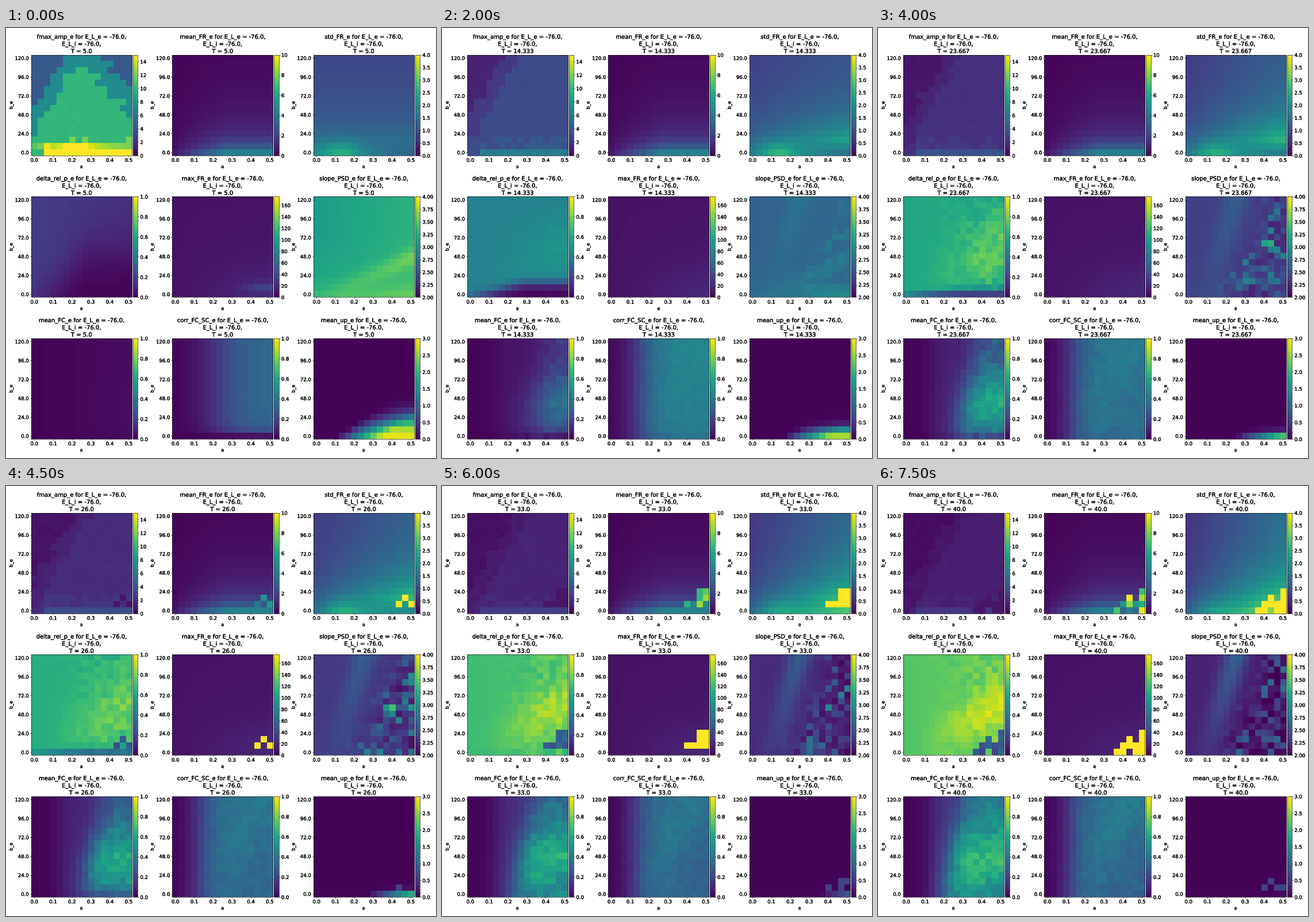
A matplotlib script that plays this animation: 748x748 px, repeating every 8 s.

```python
import numpy as np
import matplotlib.pyplot as plt
from matplotlib.animation import FuncAnimation
from matplotlib.patheffects import withStroke

SIZE, DPI, N, FRAMES = 748, 36, 16, 16
PANEL = 175.2

plt.rcParams.update({
    "font.family": "DejaVu Sans", "axes.linewidth": 1.2,
    "xtick.major.width": 1.2, "ytick.major.width": 1.2,
    "xtick.labelsize": 17, "ytick.labelsize": 17,
    "xtick.major.pad": 4.5, "ytick.major.pad": 4.5,
    "axes.labelsize": 16, "axes.titlesize": 20,
})

J, I = np.mgrid[:N, :N]
x, y = I / (N - 1), J / (N - 1)


def sigmoid(v):
    return 1 / (1 + np.exp(-np.clip(v, -40, 40)))


def bump(v, width):
    return np.exp(-(v / width) ** 2)


def ramp(v, start, end):
    return np.clip((v - start) / (end - start), 0, 1)


class Moment:
    """Progress, noise and bursting cells of one step of the sweep."""

    def __init__(self, step):
        self.s = step / (FRAMES - 1)
        self.T = 5 + 35 * self.s
        rng = np.random.default_rng(40 + step)
        self.u, self.v, self.w, chance = rng.random((4, N, N))
        corner = 1 - x + 1.2 * y < 0.31
        likely = chance < 0.85 * ramp(self.s, 0.45, 0.9)
        self.burst = corner & likely & ((J > 0) | (self.s > 0.85))

    def glide(self, start, end, bend=0):
        """Ease from start to end; a positive bend moves early, a negative one late."""
        part = np.expm1(-bend * self.s) / np.expm1(-bend) if bend else self.s
        return start + (end - start) * part

    def swell(self, height, centre, width):
        return height * bump(self.s - centre, width)


def peak_frequency(m):
    # every region keeps its own multiple of 1 / T
    border = m.glide(0.45, 0.2) + m.swell(1, 0.13, 0.06) + 1.7 * x - y
    depth = np.minimum(border, 1.7 - x - y + 4 * m.s) + 0.14 * (m.u - 0.5)
    cycles = np.where(depth < 0, 1.4, np.where(depth < 0.28, 2.4, 3.3))
    cycles = np.where((J <= 2) & (I >= 2) & (m.u > 0.25 * J), 4, cycles)
    cycles = np.where((J == 0) & (I >= 2), 6, cycles)
    z = cycles / m.T + 0.015 * (m.v - 0.5)
    z = z + 0.3 * np.exp(-20 * m.s) * bump(x - 0.35, 0.3) * (J == 1)
    return np.where(m.burst, 0.06, z)


def mean_rate(m):
    fall = 0.28 * np.exp(-J / 1.4) + 0.14 * np.exp(-J / 6)
    z = 0.015 + fall * (0.12 + 0.88 * ramp(x, 0, 0.55))
    return np.where(m.burst, 0.3 + 0.7 * m.s * m.u, z)


def rate_spread(m):
    z = m.glide(0.21, 0.15) + m.glide(0.25, 0.14) * np.exp(-y / 0.3)
    z = z + x * (m.glide(0, 0.2) + m.glide(0, 0.48, 4) * np.exp(-y / 0.28))
    z = z + m.glide(0.17, 0.08) * bump(x - 0.25, 0.2) * bump(y, 0.12)
    z = z - m.swell(0.5, 0.45, 0.4) * ramp(x, 0.3, 1) * bump(J, 1.2)
    return np.where(m.burst, 1, z)


def delta_power(m):
    edge = m.glide(0.45, 0.03, 6) * np.minimum(1, 2.5 * x - 0.4)
    shade = sigmoid((edge - y) / m.glide(0.15, 0.015, 8))
    shade = 0.97 * sigmoid((0.6 - m.s) / 0.06) * shade
    z = m.glide(0.18, 0.73, 2) + m.glide(-0.04, 0.05, 2) * x
    ridge = ramp(x, 0.15, 0.8) * bump(y - 0.04 - 0.46 * x, m.glide(0.45, 0.22))
    z = z + m.glide(0, 0.16, 1.5) * ridge
    z = z + 0.12 * ramp(m.s, 0.2, 0.5) * ramp(x, 0.25, 0.8) * (m.u - 0.5)
    return np.where(m.burst, 0.2 + 0.15 * m.u, z * (1 - shade))


def peak_rate(m):
    z = 0.05 + 0.02 * x * (1 - y) + 0.04 * x * bump(y, 0.3)
    z = z + 0.1 * np.exp(-20 * m.s) * ramp(x, 0.6, 0.9) * bump(J - 1, 0.8)
    return np.where(m.burst, 1, z)


def psd_slope(m):
    z = m.glide(0.55, 0.1, 2.5) + m.glide(0.09, -0.03, 3) * x
    z = z + m.glide(0.12, 0, 4) * np.exp(-y / 0.2)
    z = z + m.glide(0, 0.22) * bump(x - 0.2 - 0.3 * y, 0.13) * (0.2 + 0.8 * y)
    z = z + m.glide(0.13, 0, 2) * x * bump(y - 0.45 * x + 0.07, 0.1)
    z = z + m.swell(0.12, 0.2, 0.12) * ramp(x, 0.3, 0.8) * bump(J, 1.3)
    wedge = sigmoid((1.6 * x - 0.62 - y) / 0.1) + 0.6 * sigmoid((x - 0.8) / 0.06) * y
    rough = 0.55 * sigmoid((m.s - 0.35) / 0.06) * np.minimum(wedge, 1)
    lift = 0.6 + 0.6 * bump(y - 0.1 - 0.55 * x, 0.15)
    return z + rough * (lift * m.v ** 3 - 0.2 * m.w)


def connectivity(m):
    start = m.glide(0.7, 0.4) + 0.2 * y
    rise = sigmoid((x - start) / m.glide(0.2, 0.06, 6))
    shape = 0.42 + 0.58 * bump(y - 0.34, m.glide(0.2, 0.45))
    z = 0.01 + 0.02 * x + 0.5 * sigmoid((m.s - 0.23) / 0.06) * rise * shape
    z = z * (1 - m.swell(0.8, 0.35, 0.25) * bump(J, 0.8))
    z = z + m.glide(0, 0.13) * sigmoid((x - 0.27) / 0.05)
    z = z + 0.12 * ramp(m.s, 0, 0.4) * rise * (m.w - 0.5)
    return np.where(m.burst, 0.85 * z, z)


def correlation(m):
    rise = sigmoid((x - m.glide(0.45, 0.25, 4)) / m.glide(0.14, 0.08, 3))
    level = m.glide(0.31, 0.36) + m.swell(0.12, 0.3, 0.24)
    level = level + 0.05 * m.s * (bump(x - 0.3 - 0.6 * y, 0.25) - ramp(x - y, 0, 0.6))
    level = level + m.glide(0, 0.06, 3) * (m.v - 0.5)
    return 0.005 + rise * level * (1 - 0.85 * np.exp(-8 * m.s - J / 0.8))


def up_states(m):
    start = m.glide(0.22, 0.9, -1) + 0.1 * J
    z = m.glide(0.95, 0.1, -2) * ramp(x, start, start + 0.48)
    z = 0.01 + z * bump(J, m.glide(3.2, 0.4, 4))
    lit = m.burst & (m.v > 0.5)
    return np.where(lit, np.maximum(z, np.where(J == 0, 0.7, 0.2)), z)


# name, field, lowest value, highest value, colourbar step, tick format
PANELS = [
    ("fmax_amp_e", peak_frequency, 0, 15, 2, "%d"),
    ("mean_FR_e", mean_rate, 0, 10, 2, "%d"),
    ("std_FR_e", rate_spread, 0, 4, 0.5, "%.1f"),
    ("delta_rel_p_e", delta_power, 0, 1, 0.2, "%.1f"),
    ("max_FR_e", peak_rate, 0, 175, 20, "%d"),
    ("slope_PSD_e", psd_slope, 2, 4, 0.25, "%.2f"),
    ("mean_FC_e", connectivity, 0, 1, 0.2, "%.1f"),
    ("corr_FC_SC_e", correlation, 0, 1, 0.2, "%.1f"),
    ("mean_up_e", up_states, 0, 3, 0.5, "%.1f"),
]

fig = plt.figure(figsize=(SIZE / DPI, SIZE / DPI), dpi=DPI, facecolor="white")
heavy = [withStroke(linewidth=0.6, foreground="black")]


def add_axes(left, top, width):
    return fig.add_axes([left / SIZE, 1 - (top + PANEL) / SIZE, width / SIZE, PANEL / SIZE])


def thicken(ax):
    for text in [*ax.get_xticklabels(), *ax.get_yticklabels(),
                 ax.title, ax.xaxis.label, ax.yaxis.label]:
        text.set_path_effects(heavy)


images, axes = [], []
ticks = np.arange(0, N, 3)
for n, (_, _, lo, hi, step, fmt) in enumerate(PANELS):
    row, col = divmod(n, 3)
    left, top = 43.6 + 245.5 * col, 46.6 + 246.6 * row
    ax = add_axes(left, top, PANEL)
    im = ax.imshow(np.zeros((N, N)), origin="lower", aspect="auto", cmap="viridis",
                   vmin=lo, vmax=hi, interpolation="nearest")
    ax.set_xticks(ticks, [f"{k / 30:.1f}" for k in ticks])
    ax.set_yticks(ticks, [f"{k * 8:.1f}" for k in ticks])
    ax.set_xlabel("a")
    ax.set_ylabel("b_e")
    bar = fig.colorbar(im, cax=add_axes(left + PANEL + 1.8, top, PANEL / 20))
    marks = np.arange(lo, hi + 1e-6, step)
    bar.set_ticks(marks, labels=[fmt % m for m in marks])
    thicken(ax)
    thicken(bar.ax)
    images.append(im)
    axes.append(ax)


def update(step):
    m = Moment(step)
    for ax, im, (name, field, lo, hi, *_) in zip(axes, images, PANELS):
        im.set_data(lo + (hi - lo) * np.clip(field(m), 0, 1))
        ax.set_title(f"{name} for E_L_e = -76.0,\nE_L_i = -76.0,\nT = {round(m.T, 3)}")
    return images


anim = FuncAnimation(fig, update, frames=FRAMES, interval=500, repeat=True,
                     repeat_delay=0, blit=False)
plt.show()
```
